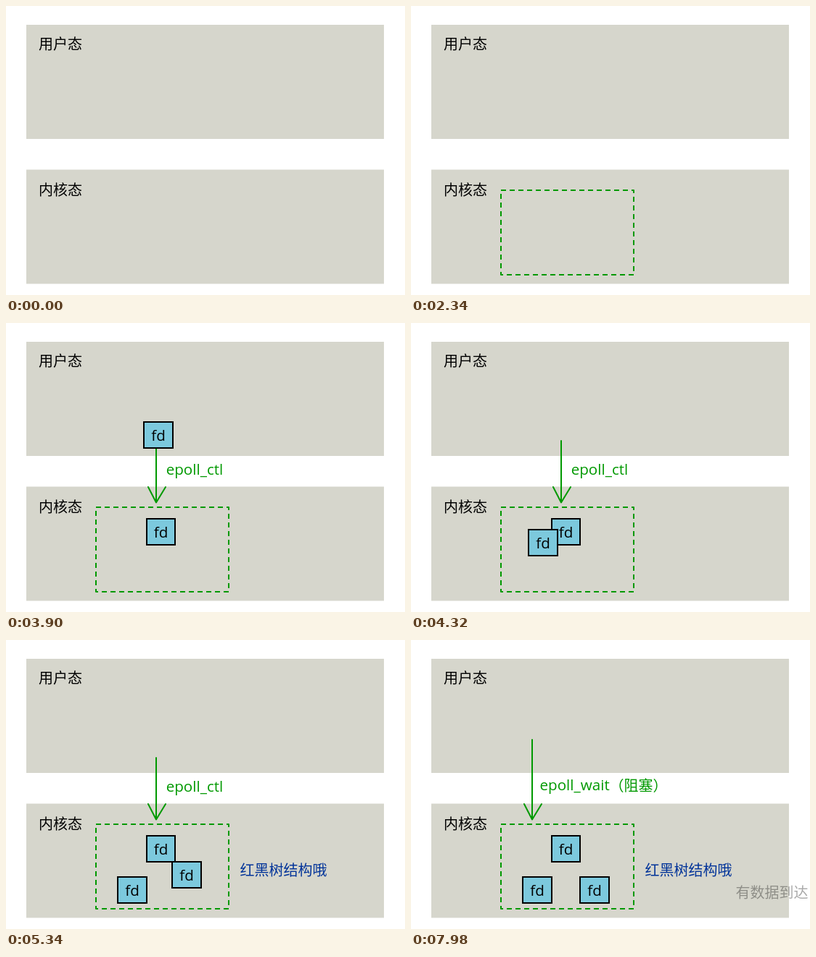
An HTML page that plays this animation: 550 px wide and 400 px high, repeating every 8 s.

```html
<!DOCTYPE html>
<html lang="zh-CN">
<head>
<meta charset="utf-8">
<title>epoll</title>
<style>
  html, body { margin: 0; width: 100%; height: 100%; overflow: hidden; background: #fff; }
  svg { display: block; width: 550px; height: 400px; }
  text { font: 20px "Noto Sans CJK SC", "Noto Sans CJK", sans-serif; }
  .latin { font: 20.6px "Open Sans", "Noto Sans", sans-serif; }
  .line { fill: none; stroke: #090; stroke-width: 2; stroke-linecap: round; stroke-linejoin: round; }
  .call text { fill: #090; }
  .fd rect { fill: #7cc9dd; stroke: #000; stroke-width: 2; }
  .fd text { text-anchor: middle; }
</style>
</head>
<body>
<svg viewBox="0 0 550 400">
  <g fill="#d6d6cc">
    <rect x="28" y="26" width="493" height="158"/>
    <rect x="28" y="226.5" width="493" height="158"/>
  </g>
  <text x="45" y="60">用户态</text>
  <text x="45" y="262">内核态</text>

  <rect id="tree" class="line" x="124" y="255" width="183" height="117"
        stroke-dasharray="7 5" style="stroke-linecap: butt"/>
  <g id="create" class="call">
    <path class="line" d="M167 163V248.5M156 227L167 248.5L180 227"/>
    <text class="latin" x="180.5" y="210">epoll_create</text>
  </g>
  <g id="ctl" class="call">
    <path class="line" d="M207 163V248.5M196 227L207 248.5L220 227"/>
    <text class="latin" x="220.7" y="210">epoll_ctl</text>
  </g>
  <g id="wait" class="call">
    <path class="line" d="M167 138V248.5M156 227L167 248.5L180 227"/>
    <text class="latin" x="177.5" y="207.5">epoll_wait</text>
    <text x="273.5" y="208.5">（阻塞）</text>
  </g>
  <text id="note" x="322.5" y="325.5" fill="#039">红黑树结构哦</text>
  <text id="arrive" x="447.5" y="357">有数据到达</text>
  <g id="nodes"></g>
</svg>
<script>
const LOOP = 8000, TICK = 60;
const el = id => document.getElementById(id);

// Times in ms; each node drops from the same start point to its place in the tree.
const start = { x: 194, y: 115.5 };
const nodes = [
  { from: 2940, to: 3540, x: 194, y: 271, w: 39 },
  { from: 3840, to: 4440, x: 154, y: 328, w: 40 },
  { from: 4800, to: 5400, x: 233, y: 328, w: 40 }
];
for (const n of nodes) {
  el('nodes').insertAdjacentHTML('beforeend',
    `<g class="fd"><rect width="${n.w}" height="36"/><text class="latin" x="${n.w / 2}" y="25.5">fd</text></g>`);
  n.el = el('nodes').lastElementChild;
}

const clamp = v => Math.max(0, Math.min(1, v));
const fade = (t, from) => clamp((t - from + TICK) / (12 * TICK));
const show = (id, opacity) => { el(id).style.opacity = opacity; };

function draw(ms) {
  const t = Math.floor((ms % LOOP) / TICK) * TICK;
  show('tree', fade(t, 540));
  show('create', t < 2340 ? fade(t, 540) : 0);
  show('ctl', nodes.some(n => t >= n.from && t < n.to) ? 1 : 0);
  show('wait', t >= 6540 ? 1 : 0);
  show('note', fade(t, 4620));
  show('arrive', fade(t, 7800));
  for (const n of nodes) {
    const p = clamp((t - n.from) / (n.to - n.from));
    const x = start.x + (n.x - start.x) * p;
    const y = start.y + (n.y - start.y) * p;
    n.el.setAttribute('transform', `translate(${Math.round(x)} ${Math.round(y)})`);
    n.el.style.opacity = t >= n.from ? 1 : 0;
  }
}

const origin = performance.now();
function frame() {
  draw(performance.now() - origin);
  requestAnimationFrame(frame);
}
frame();
</script>
</body>
</html>
```
